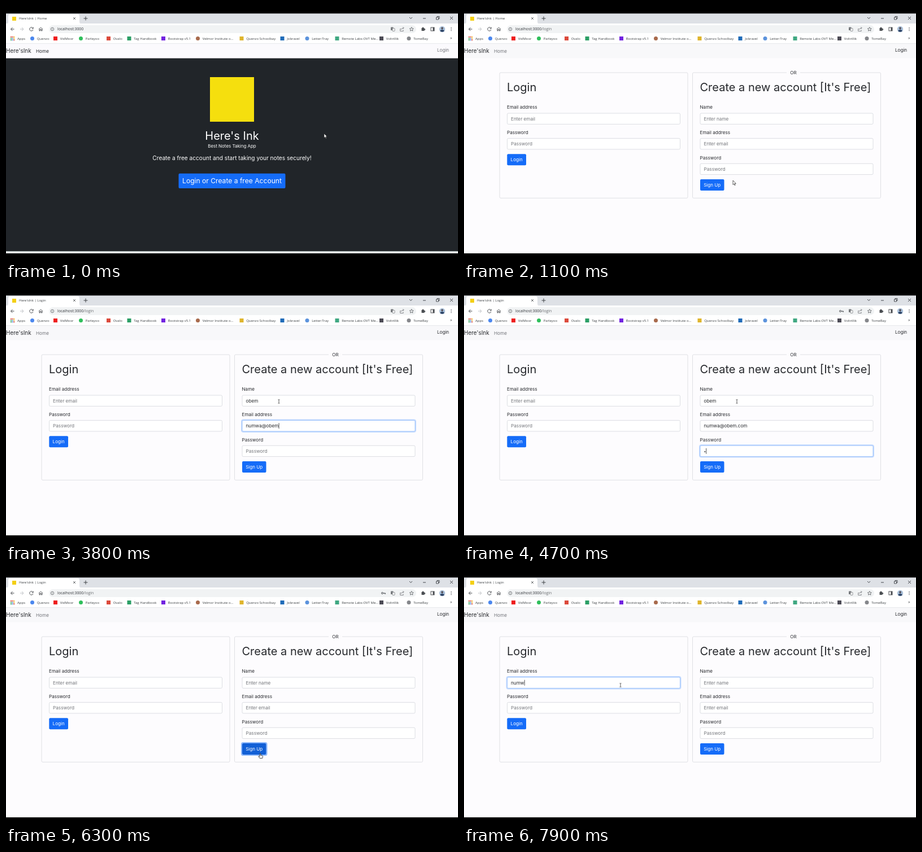
Write an HTML page that moves like this. It is 800 by 450 pixels and loops after 8000 ms.

```html
<!DOCTYPE html>
<html lang="en">
<head>
<meta charset="utf-8">
<title>Here'sInk</title>
<style>
html, body { margin: 0; width: 100%; height: 100%; overflow: hidden; background: #000; }
svg { display: block; width: 800px; height: 450px; }
text { font-family: Inter, "Open Sans", sans-serif; white-space: pre; }
.ui text { font-family: "Open Sans", "Noto Sans", sans-serif; }
</style>
</head>
<body>
<svg id="stage" viewBox="0 0 800 450" xmlns="http://www.w3.org/2000/svg"></svg>
<script>
const LOOP = 8000, STEP = 100;
const INK = '#27292d', GREY = '#74767b', BLUE = '#156cf8', DARK_BLUE = '#1260d6';
const BRAND = "Here'sInk";

const rect = (x, y, w, h, fill, more = '') =>
  `<rect x="${x}" y="${y}" width="${w}" height="${h}" fill="${fill}" ${more}/>`;
const dot = (x, y, r, fill, more = '') =>
  `<circle cx="${x}" cy="${y}" r="${r}" fill="${fill}" ${more}/>`;
const line = (d, color = '#55585c', w = 1, more = '') =>
  `<path d="${d}" fill="none" stroke="${color}" stroke-width="${w}" ${more}/>`;
const text = (x, y, size, s, fill = INK, more = '') =>
  `<text x="${x}" y="${y}" font-size="${size}" fill="${fill}" ${more}>${s}</text>`;
const mid = 'text-anchor="middle"';

// [x, icon colour, round icon, label]
const bookmarks = [
  [46.5, '#4b87ee', 1, 'Quenzo'],
  [87.5, '#ee1c1c', 0, 'VidMoor'],
  [132.5, '#2fbf5b', 1, 'Parleyoo'],
  [181.5, '#dc4a3c', 0, 'Ovalo'],
  [218, '#2c9f66', 0, 'Tag Handbook'],
  [278.5, '#7222e0', 0, 'Bootstrap v5.1'],
  [339.5, '#a86a4c', 1, 'Velmor Institute o...'],
  [417, '#dfb52c', 0, 'Quenzo Schoolbay'],
  [489, '#1f6bb8', 0, 'Jobravel'],
  [533, '#5c93dc', 1, 'Letter:Tray'],
  [586, '#3fa882', 0, 'Remote Labs-OVT Me...'],
  [664.5, '#4c4b55', 0, 'Voltrillik'],
  [713, '#85878b', 1, 'TomeBay']
];

function browser() {
  let s = rect(0, 13.3, 800, 18, '#dee1e6') + rect(0, 31, 800, 36, '#fff');
  s += '<path d="M1 31.5Q4 31 4 28V18Q4 14.500 8 14.500H126Q130 14.500 130 18V28Q130 31 133 31.500Z" fill="#fff"/>';
  s += rect(11, 19, 7, 7, '#f4cf14');
  s += text(23, 24.300, 6, '', '#3c4043', 'id="tab"');
  s += line('M119 20l4 4m0-4l-4 4', '#55585c', .9);
  s += line('M137.500 22h7M141 18.500v7', '#3f4246', 1);
  s += line('M714 20l2.500 2.500 2.500-2.500M738 22h5M786 19l5 5m0-5l-5 5', '#303338', .9);
  s += line('M761.500 20h4v4h-4zM763 20v-1.500h4v4h-1.500', '#303338', .8);
  s += line('M14.500 41H8.500M11.500 38l-3 3 3 3', '#4a4d51');
  s += line('M25 41h6M28 38l3 3-3 3', '#bfc2c6');
  s += line('M47.500 39A3.200 3.200 0 1 0 48 42M48.200 37.500v2.500h-2.500', '#4a4d51');
  s += line('M58 41.200l3.500-3.200 3.500 3.200M59 40.500v3.500h1.500v-2.500h2v2.500H64v-3.500', '#4a4d51', .9);
  s += rect(76, 34, 650, 14, '#f1f3f4', 'rx="7"');
  s += dot(82, 41, 2.8, 'none', 'stroke="#666a6e" stroke-width=".8"') + line('M82 40.500v2M82 39v.8', '#666a6e', .8);
  s += `<text x="91" y="43.400" font-size="6.850" fill="#303338">localhost:3000<tspan id="path" fill="#6a6d71">/login</tspan></text>`;
  s += `<g id="key">${dot(666, 41, 1.5, 'none', 'stroke="#55585c"')}${line('M667.500 41h4v1.800M669.800 41v1.500')}</g>`;
  s += rect(681, 37.5, 4.5, 5.5, '#777a7e', 'rx=".6"') + rect(684, 39.5, 4, 5, '#fff', 'rx=".6" stroke="#777a7e" stroke-width=".8"');
  s += line('M699 40.500h-1.300v4h5.500v-2M699.500 42q.5-3 4.500-3m-1.500-1.800l1.800 1.800-1.800 1.600', '#6a6d71', .8);
  s += line('M717.800 37.500l1 2.300 2.500.2-1.900 1.700.6 2.500-2.200-1.300-2.200 1.300.6-2.500-1.900-1.700 2.500-.2z', '#55585c', .8);
  s += rect(735.5, 39, 5, 5, '#4a4d51', 'rx=".6"') + dot(738, 38.7, 1.2, '#4a4d51') + dot(741, 41.5, 1.2, '#4a4d51');
  s += rect(752, 38, 6, 6, '#fff', 'stroke="#4a4d51"') + rect(755.5, 38, 2.5, 6, '#4a4d51');
  s += dot(772, 41, 5.2, '#a9bfd8') + dot(772, 39.3, 1.7, '#4b4348') + '<path d="M768 44.300q4-5.500 8 0q-4 3.500-8 0z" fill="#2f4668"/>';
  for (const y of [38.5, 41, 43.5]) s += dot(788, y, .75, '#4a4d51');

  const apps = ['#e0493c', '#e0493c', '#f0b428', '#35a558', '#4b87ee', '#f0b428', '#35a558', '#4b87ee', '#e0493c'];
  apps.forEach((c, i) => s += rect(8 + i % 3 * 2.7, 53.8 + Math.floor(i / 3) * 2.7, 1.9, 1.9, c));
  s += text(20, 59.6, 6, 'Apps', '#3c4043');
  for (const [x, c, round, label] of bookmarks) {
    s += round ? dot(x, 57.5, 3.5, c) : rect(x - 3.5, 54, 7, 7, c);
    s += text(x + 8.2, 59.6, 6, label, '#3c4043');
  }
  s += text(786, 59.4, 7, '»', '#3c4043') + rect(0, 66, 800, .8, '#e2e4e8');
  return `<g class="ui">${s}</g>`;
}

const fields = [
  { x: 76.5, y: 190, hint: 'Enter email', label: 'Email address' },
  { x: 76.5, y: 234.5, hint: 'Password', label: 'Password' },
  { x: 418, y: 190, hint: 'Enter name', label: 'Name' },
  { x: 418, y: 234.5, hint: 'Enter email', label: 'Email address' },
  { x: 418, y: 279.2, hint: 'Password', label: 'Password' }
];
const FW = 306, FH = 19.4;

const homeButton = { id: 'start', x: 305.5, y: 296.7, w: 189, h: 26.3 };
const signButton = { id: 'sign', x: 418, y: 307, w: 42.5, h: 20 };
const loginButton = { id: 'log', x: 76.3, y: 262.3, w: 33.7, h: 20 };

const ring = ({ id, x, y, w, h }, color, size) =>
  rect(x - size / 2, y - size / 2, w + size, h + size, 'none',
    `id="${id}Ring" rx="2.6" stroke="${color}" stroke-width="${size}"`);
const button = (b, size, label) => rect(b.x, b.y, b.w, b.h, BLUE, `id="${b.id}" rx="2"`) +
  text(b.x + b.w / 2, b.y + b.h / 2 + size * .36, size, label, '#fff', mid);

function home() {
  return rect(0, 92.6, 800, 342, '#212529') + rect(0, 434.5, 800, 3.7, '#f1fbfa') +
    rect(361, 126, 78, 79, '#f5df0e') +
    text(400, 237, 20, "Here's Ink", '#fff', mid) +
    text(400, 251.3, 7.95, 'Best Notes Taking App', '#fff', mid) +
    text(400, 272.8, 10.15, 'Create a free account and start taking your notes securely!', '#fff', mid) +
    ring(homeButton, '#33456a', .8) + button(homeButton, 12.1, 'Login or Create a free Account');
}

function forms() {
  const card = x => rect(x, 118, 333, 222.3, 'none', 'rx="2" stroke="#dfe0e4"');
  let s = rect(0, 92.6, 800, 345.6, '#fdfcfe') + card(63) + card(404.5);
  s += rect(571, 113, 24, 10, '#fdfcfe') + text(583, 121.4, 8, 'OR', INK, mid);
  s += text(76, 151, 20, 'Login') + text(417.5, 151, 20, "Create a new account [It's Free]");
  fields.forEach((f, i) => {
    s += text(f.x - .5, f.y - 7.6, 8.15, f.label);
    s += rect(f.x - 1, f.y - 1, FW + 2, FH + 2, 'none', `id="ring${i}" rx="3" stroke="#c5dbfe" stroke-width="2"`);
    s += rect(f.x, f.y, FW, FH, '#fff', `id="box${i}" rx="2" stroke-width=".8"`);
    s += text(f.x + 6.5, f.y + 12.6, 8.2, '', INK, `id="val${i}"`);
  });
  s += rect(0, 0, .8, 10, INK, 'id="caret"');
  s += button(loginButton, 8.1, 'Login') + ring(signButton, '#8cb8fc', 2) + button(signButton, 8.1, 'Sign Up');
  s += `<g id="toast">${rect(263.5, 230.5, 273, 36.5, '#c8e3d7', 'rx="2" stroke="#b9d9ca" stroke-width=".8"')}` +
    text(400, 250.7, 12.2, 'User successfully created (Please login now)', '#2b6650', mid) + '</g>';
  return s;
}

function pointers() {
  return '<path id="arrow" d="M0 0V7.600L1.800 6 3 8.700 4.200 8.200 3 5.500H5.300Z" fill="#fff" stroke="#222" stroke-width=".7"/>' +
    '<path id="hand" d="M-.8.4Q0-.6.8.4V3.200L3.800 4Q4.700 4.300 4.500 5.300L3.800 8.500H-.8L-3.200 5.200Q-2.500 4.200-.8 5.300Z" fill="#fff" stroke="#222" stroke-width=".8"/>' +
    line('M-1.500-3.200H-.4L0-2.800.4-3.200H1.500M0-2.800V2.800M-1.500 3.200H-.4L0 2.800.4 3.200H1.500', '#333', .8, 'id="beam"');
}

const stage = document.getElementById('stage');
stage.innerHTML = rect(0, 0, 800, 450, '#000') + browser() +
  rect(0, 67, 800, 26, '#f8f9fb', 'id="nav"') +
  text(0, 83.4, 9.95, BRAND) + text(53, 83, 8.2, 'Home', INK, 'id="navHome"') +
  text(763, 80.5, 8.1, 'Login', INK, 'id="navLogin"') +
  `<g id="home">${home()}</g><g id="forms">${forms()}</g>` + pointers();

const el = {};
stage.querySelectorAll('[id]').forEach(n => el[n.id] = n);
const set = (id, name, v) => el[id].setAttribute(name, v);
const show = (id, on) => set(id, 'display', on ? 'inline' : 'none');

const run = (from, n) => Array.from({ length: n }, (_, i) => from + i * STEP);
const typing = [
  { i: 2, s: 'obem', at: run(1800, 4) },
  { i: 3, s: 'numwa@obem.com', at: [...run(2600, 5), 3200, ...run(3500, 4), ...run(4000, 4)] },
  { i: 4, s: '••••••', at: [...run(4700, 5), 5300] },
  { i: 0, s: 'numw', at: run(7600, 4) }
];
const CLEAR = 6300;

// [start, focused part]
const focusSteps = [[0, ''], [1000, 'start'], [1100, ''], [1700, 2], [2300, 3], [4500, 4], [6000, 'sign'], [7500, 0]];
// [time, x, y]
const route = [
  [0, 563, 226], [900, 479, 309], [1000, 479, 309], [1100, 476, 309], [1600, 483, 201], [5600, 483, 201],
  [5900, 450, 325], [6300, 450, 325], [6800, 279, 200], [7000, 279, 200], [7400, 277, 204], [8000, 277, 204]
];

function pointerAt(t) {
  const k = route.findIndex(p => p[0] > t);
  const [t0, x0, y0] = route[k - 1], [t1, x1, y1] = route[k];
  const u = (t - t0) / (t1 - t0), e = u * u * (3 - 2 * u);
  return [x0 + (x1 - x0) * e, y0 + (y1 - y0) * e];
}
const inside = (x, y, b, w = b.w, h = b.h) => x >= b.x && x <= b.x + w && y >= b.y && y <= b.y + h;

function drawFields(t, focus) {
  show('caret', false);
  fields.forEach((f, i) => {
    const job = typing.find(j => j.i === i);
    const live = job && (i === 0 || t < CLEAR);
    const n = live ? job.at.filter(a => a <= t).length : 0;
    const node = el['val' + i], on = focus === i;
    node.textContent = n ? job.s.slice(0, n) : f.hint;
    set('val' + i, 'fill', n ? INK : GREY);
    set('val' + i, 'font-size', n && i === 4 ? 6.5 : 8.2);
    show('ring' + i, on);
    set('box' + i, 'stroke', on ? '#8ab6fb' : '#d3d6dc');
    if (!on) return;
    const start = focusSteps.find(s => s[1] === i)[0];
    const last = n ? job.at[n - 1] : start;
    show('caret', (t - last) % 1000 < 500);
    set('caret', 'x', f.x + 6.7 + (n ? node.getComputedTextLength() : 0));
    set('caret', 'y', f.y + 4.7);
  });
}

function draw(t) {
  const login = t >= 1100;
  const focus = focusSteps.filter(s => s[0] <= t).pop()[1];
  const [x, y] = pointerAt(t);

  show('home', !login);
  show('forms', login);
  show('path', login);
  show('key', t >= 4700 && t < 7500);
  el.tab.textContent = BRAND + (t < 1200 ? ' | Home' : ' | Login');
  set('nav', 'fill', login ? '#f8f8fa' : '#fbfafd');
  set('navHome', 'fill', login ? GREY : INK);
  set('navLogin', 'fill', login ? INK : GREY);

  const overStart = !login && inside(x, y, homeButton);
  const overSign = login && inside(x, y, signButton);
  const overLogin = login && inside(x, y, loginButton);
  set('start', 'fill', overStart ? DARK_BLUE : BLUE);
  set('sign', 'fill', overSign || focus === 'sign' ? DARK_BLUE : BLUE);
  set('log', 'fill', overLogin ? DARK_BLUE : BLUE);
  show('startRing', focus === 'start');
  show('signRing', focus === 'sign');

  drawFields(t, focus);
  const fade = Math.min((t - 6500) / 550, (7600 - t) / 300, 1);
  set('toast', 'opacity', Math.max(0, fade));

  const overField = login && fields.some(f => inside(x, y, f, FW, FH));
  const kind = overField ? 'beam' : overStart || overSign || overLogin ? 'hand' : 'arrow';
  for (const id of ['arrow', 'hand', 'beam']) {
    show(id, id === kind);
    set(id, 'transform', `translate(${x} ${y})`);
  }
}

const origin = performance.now();
function tick() {
  const t = (performance.now() - origin) % LOOP;
  draw(Math.floor(t / STEP) * STEP);
  requestAnimationFrame(tick);
}
tick();
</script>
</body>
</html>
```
